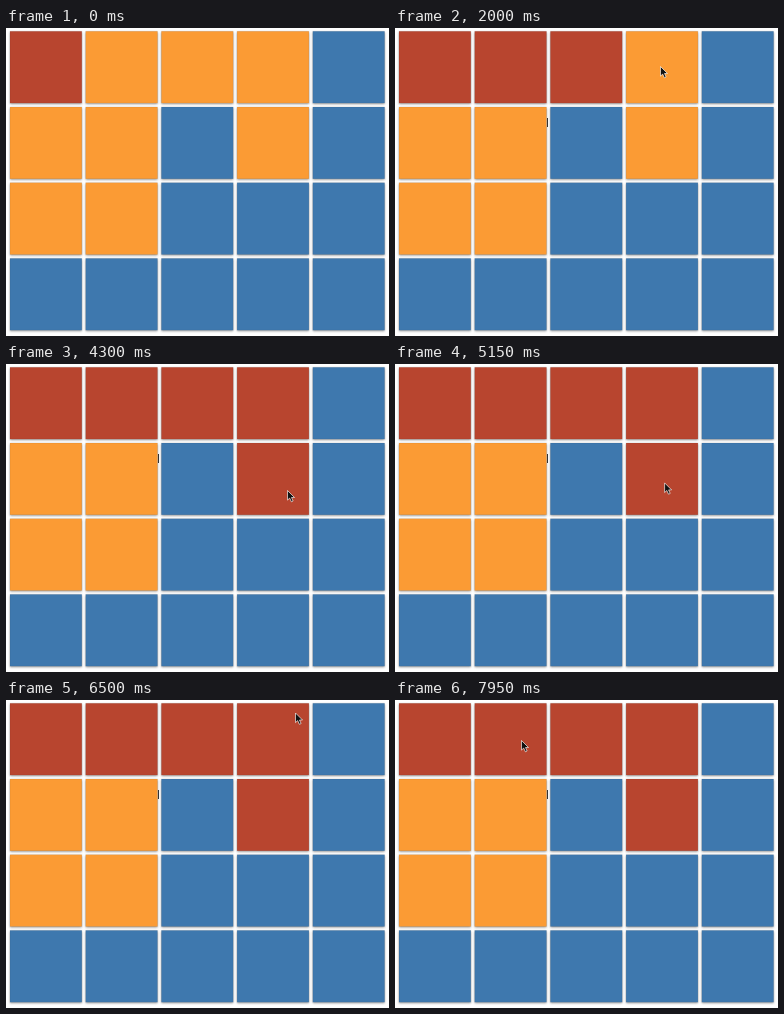
Write an HTML page that moves like this. It is 383x308 px and loops after 8000 ms.

```html
<!DOCTYPE html>
<html lang="en">
<head>
<meta charset="utf-8">
<title>Grid walk</title>
<style>
  html, body { margin: 0; width: 100%; height: 100%; overflow: hidden; background: #fff; }
  svg { display: block; width: 383px; height: 308px; }
</style>
</head>
<body>
<svg viewBox="0 0 383 308">
  <defs>
    <filter id="soft" x="-10%" y="-10%" width="120%" height="120%">
      <feGaussianBlur stdDeviation="0.8"/>
    </filter>
  </defs>
  <g id="tiles"></g>
  <path id="caret" d="M152.5 90V99" stroke="#333"/>
  <path id="pointer" d="M0 0V9.6L2.2 7.6L3.9 11.3L5.6 10.5L4 7H7Z"
        fill="#111" stroke="#fff" stroke-width="0.8" stroke-opacity="0.8"/>
</svg>
<script>
const LOOP = 8000, STEP = 50, BEAT = 850, PITCH = 75.7, SIZE = 71.8;
const RED = '#b8452f', ORANGE = '#fb9b34', BLUE = '#3e78ae';
const LAYOUT = ['oooob', 'oobob', 'oobbb', 'bbbbb'];

// The walk goes right along the top row, then down; one cell turns red per beat.
const visitBeat = (row, col) =>
  row === 0 && col < 4 ? col : row === 1 && col === 3 ? 4 : Infinity;

const TRACK = [
  { t: 50, x: 40, y: 38 },
  { t: 2000, x: 265.5, y: 38.5 },
  { t: 3300, x: 282.5, y: 113.5 },
  { t: 4300, x: 281.5, y: 126.5 },
  { t: 6100, x: 255.5, y: 110 },
  { t: 6500, x: 289.5, y: 13 },
  { t: 7950, x: 126.5, y: 40.5 }
];

const byId = id => document.getElementById(id);
const show = (id, on) => byId(id).setAttribute('visibility', on ? 'visible' : 'hidden');
const smooth = u => u * u * (3 - 2 * u);
const mix = (a, b, u) => a + (b - a) * u;

function addRect(x, y, attrs) {
  const rect = document.createElementNS('http://www.w3.org/2000/svg', 'rect');
  const all = { x, y, width: SIZE, height: SIZE, ...attrs };
  for (const key in all) rect.setAttribute(key, all[key]);
  return byId('tiles').appendChild(rect);
}

const tiles = LAYOUT.flatMap((line, row) => [...line].map((kind, col) => {
  const x = 4 + col * PITCH, y = 3.3 + row * PITCH;
  addRect(x, y + 1, { fill: '#777', opacity: 0.75, filter: 'url(#soft)' });
  const rect = addRect(x, y, { stroke: '#000', 'stroke-opacity': 0.08, 'stroke-width': 0.8 });
  return { rect, color: kind === 'o' ? ORANGE : BLUE, turnsAt: BEAT * visitBeat(row, col) };
}));

function pointerAt(t) {
  const i = TRACK.findIndex(key => key.t > t);
  if (i < 1) return i ? TRACK[TRACK.length - 1] : TRACK[0];
  const a = TRACK[i - 1], b = TRACK[i], u = smooth((t - a.t) / (b.t - a.t));
  return { x: mix(a.x, b.x, u), y: mix(a.y, b.y, u) };
}

function render(time) {
  const t = Math.floor((time % LOOP) / STEP) * STEP;
  for (const { rect, color, turnsAt } of tiles) rect.setAttribute('fill', t >= turnsAt ? RED : color);
  const { x, y } = pointerAt(t);
  byId('pointer').setAttribute('transform', `translate(${x.toFixed(1)} ${y.toFixed(1)})`);
  show('pointer', t >= TRACK[0].t);
  show('caret', t >= BEAT);
}

const start = performance.now();
function frame() {
  render(performance.now() - start);
  requestAnimationFrame(frame);
}
frame();
</script>
</body>
</html>
```
